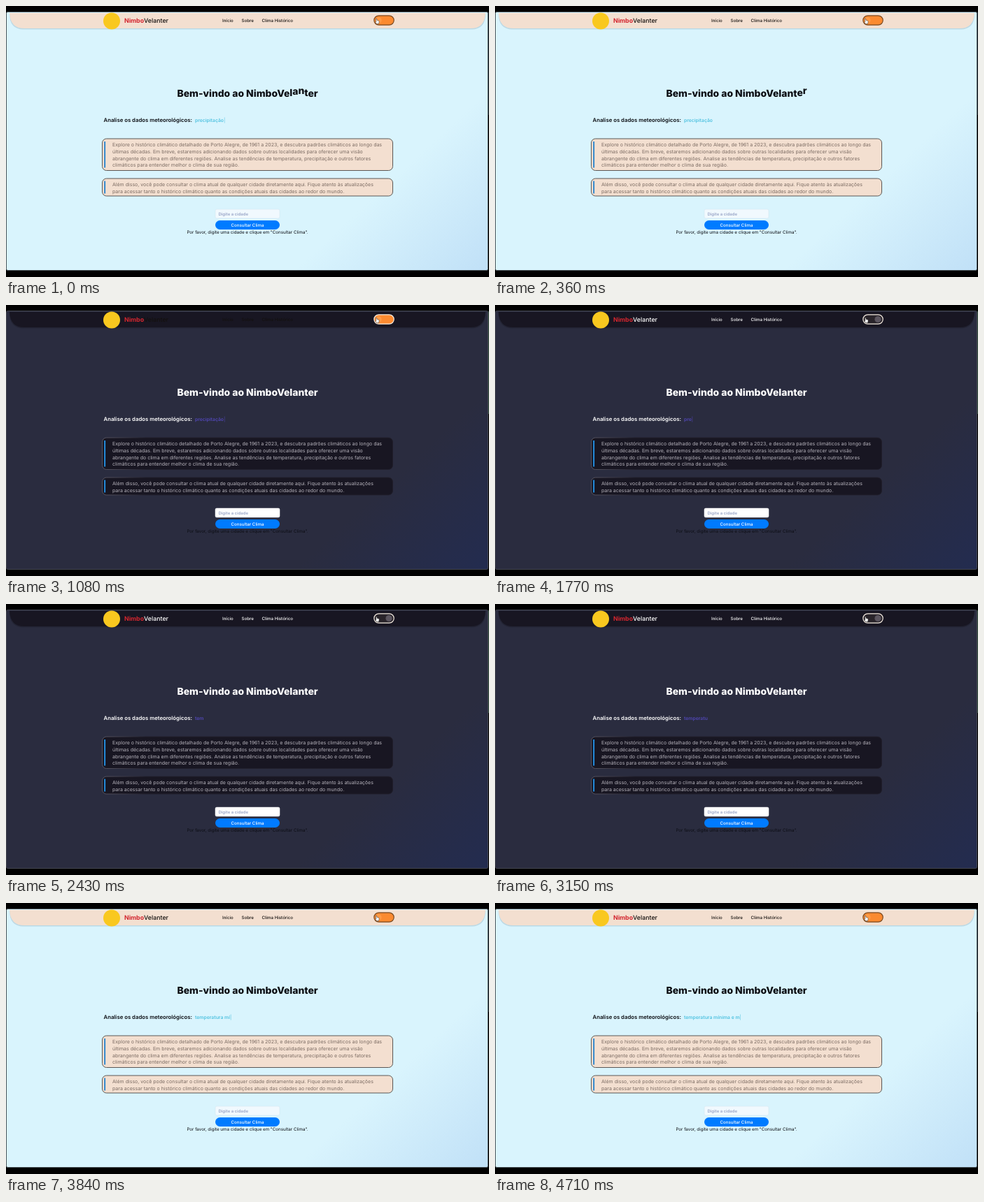
An HTML page that plays this animation: 690 by 388 pixels, repeating every 4770 ms.

```html
<!DOCTYPE html>
<html lang="pt-BR">
<head>
<meta charset="utf-8">
<title>NimboVelanter</title>
<style>
@property --mix { syntax: '<number>'; inherits: true; initial-value: 0; }

html, body { margin: 0; width: 100%; height: 100%; overflow: hidden; background: #000; }

svg {
  display: block;
  width: 100vw;
  height: 100vh;
  font: 400 7px Inter, 'Open Sans', sans-serif;
  text-rendering: geometricPrecision;
  animation: theme 4770ms step-end infinite, soften 4770ms ease-in-out infinite;
}

@keyframes theme {
  0%, 67.19%, 100% {
    --page: #d9f4fd; --corner: #c0e0f7; --panel: #f3dfd0; --ink: #0b0d12;
    --body: #7b6b62; --typed: #50c2e0; --edge: #4a4644; --edge-end: #4a4644;
    --field: #f1f9fe; --field-edge: #cfe3ec; --hint: #0b0d12; --rim: #7a4a22;
    --bar: #2b86cf; --side: #1f2a30; --shade: #7fa3b355; --frame: #4a5459;
  }
  22.54% {
    --page: #2a2c3f; --corner: #232c50; --panel: #181622; --ink: #ffffff;
    --body: #b7b4bd; --typed: #5147b6; --edge: #5f5c68; --edge-end: #211f2b;
    --field: #ffffff; --field-edge: #ffffff; --hint: #0d0e15; --rim: #f4ebe1;
    --bar: #2492e6; --side: #2f4a3c; --shade: #15152055; --frame: #44464f;
  }
}

@keyframes soften {
  0%, 22.54% { --mix: 0; }
  32.1%, 67.19% { --mix: 1; }
  75.5%, 100% { --mix: 0; }
}

text { white-space: pre; fill: var(--ink); }
.page { fill: url(#sky); stroke: var(--frame); }
.panel { fill: var(--panel); }
.card { fill: var(--panel); stroke: url(#edge); stroke-width: .9; }
.bar { fill: var(--bar); }
.body text { fill: var(--body); }
.soft { fill: color-mix(in srgb, #fff calc(var(--mix) * 100%), #14110f); }
.brand { font-size: 8.8px; font-weight: 500; }
.brand tspan { font-weight: 700; fill: #d3262f; }
.nav { font-size: 6.15px; font-weight: 500; }
.title { font-size: 13.9px; font-weight: 800; text-anchor: middle; }
.label { font-size: 7.75px; font-weight: 600; }
.typed { font-size: 6.8px; font-weight: 600; fill: var(--typed); }
.caret { font-weight: 400; }
.field { fill: var(--field); stroke: var(--field-edge); stroke-width: .5; }
.placeholder { font-size: 5.95px; font-weight: 600; fill: #98a4c6; }
.button { font-size: 6.2px; font-weight: 500; text-anchor: middle; fill: #fff; }
.hint { font-size: 6.22px; text-anchor: middle; fill: var(--hint); }
.track {
  fill: color-mix(in srgb, #29242a calc(var(--mix) * 100%), #fb8a30);
  stroke: var(--rim);
  stroke-width: 1.2;
}
.knob {
  fill: color-mix(in srgb, #5c5660 calc(var(--mix) * 100%), #ff9a45);
  transform: translateX(calc(var(--mix) * 15px));
}
</style>
</head>
<body>
<svg viewBox="0 0 690 388" preserveAspectRatio="none">
  <defs>
    <linearGradient id="sky" gradientUnits="userSpaceOnUse" x1="550" y1="250" x2="680" y2="390">
      <stop offset="0" style="stop-color:var(--page)"/>
      <stop offset="1" style="stop-color:var(--corner)"/>
    </linearGradient>
    <linearGradient id="edge" gradientUnits="userSpaceOnUse" x1="137" y1="0" x2="200" y2="0">
      <stop offset="0" style="stop-color:var(--edge)"/>
      <stop offset="1" style="stop-color:var(--edge-end)"/>
    </linearGradient>
  </defs>

  <rect width="690" height="388"/>
  <rect class="page" x=".5" y="8.5" width="688" height="370" rx="2"/>
  <rect x="689" y="9" width="1" height="147" style="fill:var(--side)"/>

  <path d="M5 11H685Q685 33.5 665 33.5H25Q5 33.5 5 11Z" style="fill:var(--shade)"/>
  <path class="panel" d="M5 10H685Q684 32 664 32H26Q6 32 5 10Z"/>
  <circle cx="151" cy="21.5" r="12" fill="#f9c81f"/>
  <text class="brand soft" x="169" y="23.6"><tspan>Nimbo</tspan>Velanter</text>
  <g class="nav">
    <text class="soft" x="309" y="22.6">Início</text>
    <text class="soft" x="336.5" y="22.6">Sobre</text>
    <text class="soft" x="365.5" y="22.6">Clima Histórico</text>
  </g>
  <rect class="track" x="525.8" y="13.8" width="28.4" height="13.4" rx="6.7"/>
  <circle class="knob" cx="532" cy="20.5" r="4.6"/>
  <path d="M528.4 18.2q.8-.7 1.3.2l.4 2.1 2.3.6q.8.3.7 1.1l-.5 3.2-3 .4-2-2.9q.2-.8 1.2-.3z"
        fill="#fff" stroke="#222" stroke-width=".5"/>

  <text class="title" x="345" y="130.4"></text>
  <text class="label" x="139.5" y="166.3">Analise os dados meteorológicos:</text>
  <text class="typed" x="270" y="165.8"><tspan class="word"></tspan><tspan class="caret">|</tspan></text>

  <rect class="card" x="137.5" y="190" width="415" height="45.5" rx="6"/>
  <rect class="bar" x="140.2" y="194" width="1.9" height="37.5"/>
  <rect class="card" x="137.5" y="247" width="415" height="25" rx="6"/>
  <rect class="bar" x="140.2" y="250.5" width="1.9" height="18"/>
  <g class="body">
    <text x="152" y="200.6">Explore o histórico climático detalhado de Porto Alegre, de 1961 a 2023, e descubra padrões climáticos ao longo das</text>
    <text x="152" y="210.5">últimas décadas. Em breve, estaremos adicionando dados sobre outras localidades para oferecer uma visão</text>
    <text x="152" y="220.5">abrangente do clima em diferentes regiões. Analise as tendências de temperatura, precipitação e outros fatores</text>
    <text x="152" y="230.4">climáticos para entender melhor o clima de sua região.</text>
    <text x="152" y="257.5">Além disso, você pode consultar o clima atual de qualquer cidade diretamente aqui. Fique atento às atualizações</text>
    <text x="152" y="267.5">para acessar tanto o histórico climático quanto as condições atuais das cidades ao redor do mundo.</text>
  </g>

  <rect class="field" x="299" y="291" width="92" height="13" rx="2"/>
  <text class="placeholder" x="303.5" y="299.5">Digite a cidade</text>
  <rect x="299" y="307" width="92" height="13" rx="6.5" fill="#007bff"/>
  <text class="button" x="345" y="315.6">Consultar Clima</text>
  <text class="hint" x="345" y="326.4">Por favor, digite uma cidade e clique em "Consultar Clima".</text>
</svg>

<script>
const LOOP = 4770;
const TITLE = 'Bem-vindo ao NimboVelanter';
const OLD_WORD = 'precipitação';
const NEW_WORD = 'temperatura mínima e máxima';
const [title, word, caret] = ['.title', '.word', '.caret'].map(s => document.querySelector(s));
title.textContent = TITLE;

// Height of a letter in the wave that runs along the title.
function hop(index, t) {
  const phase = (t - (index - 21.6) * 95) / 240;
  return Math.abs(phase) < 1 ? 4.2 * Math.cos(phase * Math.PI / 2) ** 2 : 0;
}

function typedText(t) {
  if (t < 2190) {
    const erased = Math.max(0, Math.floor((t - 1130) / 70));
    return OLD_WORD.slice(0, Math.max(0, OLD_WORD.length - erased));
  }
  return NEW_WORD.slice(0, Math.floor((t - 2190) / 120) + 1);
}

function setTitle(t) {
  let previous = 0;
  const shifts = [...TITLE].map((_, i) => {
    const height = hop(i, t);
    const shift = previous - height;
    previous = height;
    return shift.toFixed(3);
  });
  title.setAttribute('dy', shifts.join(' '));
}

let start;
function render(now) {
  start ??= now;
  const t = (now - start) % LOOP;
  setTitle(t);
  word.textContent = typedText(t);
  caret.style.opacity = Math.cos(2 * Math.PI * t / 950) > -.3 ? 1 : 0;
  requestAnimationFrame(render);
}
requestAnimationFrame(render);
</script>
</body>
</html>
```
